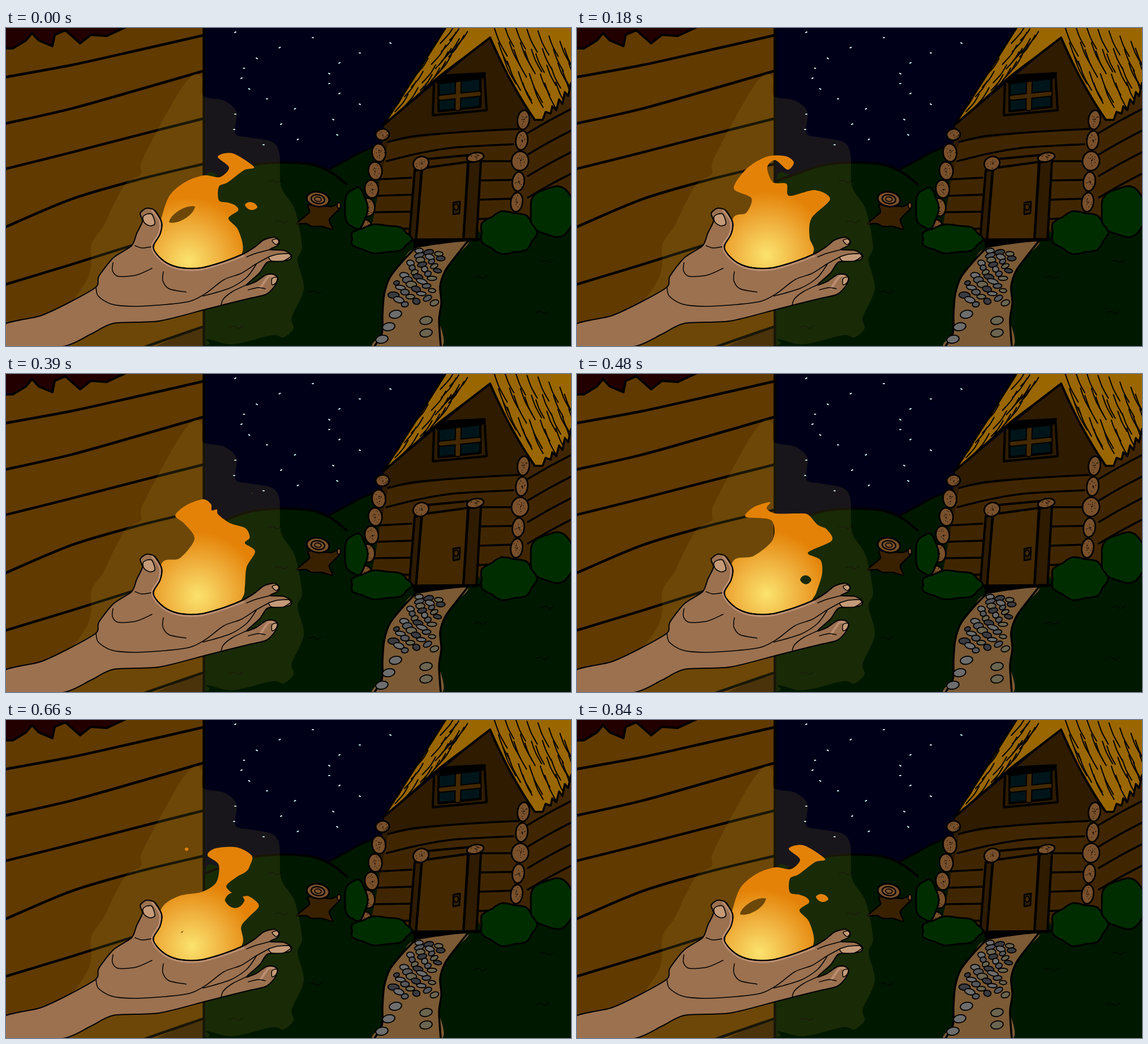
An HTML page with a canvas that plays this animation: 998 px wide and 561 px high, repeating every 870 ms.

```html
<!DOCTYPE html>
<html lang="en">
<head>
<meta charset="utf-8">
<title>Hand flame at night</title>
<style>
  html, body { margin: 0; width: 100%; height: 100%; overflow: hidden; background: #000; }
  canvas { display: block; }
</style>
</head>
<body>
<canvas id="stage" width="998" height="561"></canvas>
<script>
const W = 998, H = 561, LOOP = 870, STEP = 30;
const INK = '#000', DARK = '#2e1b00', LOG = '#402600', STONE = '#79502b', LEAF = '#002d00', NAIL = '#c49a78';

let seed = 7;
const random = (from = 0, to = 1) =>
  from + (to - from) * (seed = seed * 16807 % 2147483647) / 2147483647;
const mix = (a, b, u) => a + (b - a) * u;
const points = s => Array.isArray(s) ? s : s.trim().split(/\s+/).map(p => p.split(',').map(Number));

// Smooth curve through points; bend 0 gives straight edges.
function curve(shape, closed = true, bend = .15) {
  const pts = points(shape), n = pts.length, path = new Path2D();
  const at = i => closed ? pts[(i + n) % n] : pts[Math.max(0, Math.min(n - 1, i))];
  path.moveTo(...pts[0]);
  for (let i = 0; i < (closed ? n : n - 1); i++) {
    const [a, b, c, d] = [at(i - 1), at(i), at(i + 1), at(i + 2)];
    path.bezierCurveTo(b[0] + (c[0] - a[0]) * bend, b[1] + (c[1] - a[1]) * bend,
      c[0] - (d[0] - b[0]) * bend, c[1] - (d[1] - b[1]) * bend, c[0], c[1]);
  }
  if (closed) path.closePath();
  return path;
}

function makeLayer(paint) {
  const canvas = document.createElement('canvas');
  canvas.width = W;
  canvas.height = H;
  const c = canvas.getContext('2d');
  c.lineCap = c.lineJoin = 'round';
  const fillPath = (path, fill, width) => {
    c.fillStyle = fill;
    c.fill(path);
    if (width) strokePath(path, width);
  };
  const strokePath = (path, width, color = INK) => {
    c.lineWidth = width;
    c.strokeStyle = color;
    c.stroke(path);
  };
  paint({
    c,
    area: (s, fill, width, bend) => fillPath(curve(s, true, bend), fill, width),
    line: (s, width, color, bend) => strokePath(curve(s, false, bend), width, color),
    oval(x, y, rx, ry, fill, width, turn = 0) {
      const path = new Path2D();
      path.ellipse(x, y, rx, ry, turn, 0, 7);
      fillPath(path, fill, width);
    },
    bush(x, y, rx, ry, bumps) {
      const rim = Array.from({ length: 28 }, (_, i) => {
        const a = i / 28 * Math.PI * 2, r = 1 + .05 * Math.cos(a * bumps);
        return [x + rx * r * Math.cos(a), y + ry * r * Math.sin(a)];
      });
      fillPath(curve(rim), LEAF, 3);
    }
  });
  return canvas;
}

function landscape({ c, area, line }) {
  c.fillStyle = '#000018';
  c.fillRect(0, 0, W, H);
  for (let i = 0; i < 23; i++) {
    const y = 8 + i * 9, x = 365 + (i * 137 + 40) % (350 - y * .5);
    line([[x - 1, y], [x + 1, y + i % 3 - 1]], 2, '#c4eef2');
  }
  const hill = '352,270 380,260 430,243 470,238 515,238 545,242 575,255 602,276';
  const farHill = '570,250 600,234 625,220 657,207';
  area(farHill + ' 998,207 998,561 570,561', '#001800', 0, 0);
  line(farHill, 3);
  area(hill + ' 660,561 350,561', '#001800', 0, .1);
  line(hill, 4);
  for (const [x, y] of points('463,271 475,342 534,466 826,440 935,502 944,412 395,528'))
    line([[x, y], [x + 9, y - 2], [x + 16, y + 2], [x + 24, y - 3]], 1.2);
}

function stump({ area, oval }) {
  area('534,312 536,325 513,345 530,345 540,350 558,350 577,355 571,338 590,318 589,309 574,315', '#392100', 2.5, .1);
  oval(588, 313, 3, 5, STONE, 2);
  for (const r of [20, 12, 6]) oval(551, 302, r, r * .65, STONE, 1 + r / 10, .15);
}

function thatch({ c, area, line }, roof, edge, strokes, place, dx, dy) {
  area(roof, '#996600', 0, 0);
  c.save();
  c.clip(curve(roof, true, 0));
  for (let i = 0; i < strokes; i++) {
    const [x, y] = place(i / strokes), s = random(.7, 1.2);
    line([[x, y], [x + dx * s * .4, y + dy * s * .5], [x + dx * s, y + dy * s]], 2);
  }
  c.restore();
  line(edge, 3.5, INK, 0);
}

function cabin(pen) {
  const { c, area, line, oval } = pen;
  area('855,17 668,172 650,355 720,378 900,350 935,165', DARK, 0, 0);
  area('675,201 800,184 905,178 895,345 720,378 645,355', LOG, 0, 0);
  area('915,160 998,95 998,340 895,340', LOG, 0, 0);
  line('675,201 720,191 800,184 905,178', 3.5);
  line('672,235 725,222 790,211 896,205', 3.5);
  for (let i = 0; i < 4; i++) {
    line([[660 - i * 5, 267 + i * 29], [716, 264 + i * 30]], 3.5);
    line([[834, 235 + i * 34], [894, 235 + i * 33]], 3.5);
    line([[922, 185 + i * 38], [960, 163 + i * 38], [998, 143 + i * 38]], 3.5);
  }

  const eaves = '934,162 948,162 953,148 962,151 965,138 972,145 977,126 983,134 987,113 993,120 998,97';
  const leftEdge = '778,-3 735,65 690,135 667,171', gable = '855,17 812,50 760,90 715,130 667,171';
  thatch(pen, leftEdge + ' 715,130 760,90 812,50 855,17 870,-5', leftEdge, 26,
    u => [mix(810, 680, u) + random(-15, 30), mix(-10, 140, u)], -24, 32);
  thatch(pen, '855,17 890,90 915,133 ' + eaves + ' 998,-5 780,-5', eaves, 34,
    u => [mix(862, 990, u * 5 % 1) + u * 20, mix(-15, 100, u) + random(0, 20)], 20, 44);
  line(gable, 4);
  line('855,17 870,50 890,90 915,133 934,162', 4);

  area('756,94 845,80 849,145 754,154', DARK, 4, 0);
  area('764,97 838,87 838,139 764,147', '#001519', 4, 0);
  for (const [width, color] of [[12, INK], [8, '#432800']]) {
    line('799,95 798,141', width, color);
    line('768,123 835,116', width - 1, color);
  }
  area('758,94 778,83 846,79 840,89 800,94 766,98', INK, 2, .05);

  area('735,247 816,235 808,373 724,374', '#432800', 4, 0);
  area('722,251 734,251 724,376 712,374', DARK, 4, 0);
  area('817,237 839,233 831,374 808,373', DARK, 4, 0);
  area('745,231 820,224 818,236 745,246', LOG, 4, 0);
  area('720,374 808,372 811,383 722,388', INK, 2, 0);
  line('718,374 835,373', 5);
  area('790,308 802,306 801,327 790,329', DARK, 2.5, 0);
  oval(795, 316, 4, 5, '#432800', 2);

  function stone(x, y, rx, ry, turn = 0) {
    oval(x, y, rx, ry, STONE, 2.8, turn);
    c.fillStyle = INK;
    for (let k = 0; k < 14; k++) {
      const a = random(0, 6.3), r = random(0, .75);
      c.fillRect(x + Math.cos(a) * rx * r, y + Math.sin(a) * ry * r, 1.2, 1.2);
    }
  }
  for (let i = 0; i < 6; i++) stone(665 - i * 6.4, 188 + i * 32, 12, i % 5 ? 16 : 10, -.1);
  for (let i = 0; i < 5; i++) stone(914 - i * 3, 162 + i * 36.3, i === 2 ? 15 : 10.5, 17, .12);
  stone(733, 239, 14, 12, -.4);
  stone(829, 228, 15, 8, -.2);
}

function garden({ area, line, oval, bush }) {
  const left = '722,389 700,412 678,440 668,470 665,505 664,538 650,563';
  const right = '768,563 765,515 769,485 767,455 776,428 795,402 815,377';
  area(left + ' ' + right, '#7b5a35', 0, .12);
  line(left, 3.5);
  line(right, 3.5);
  const greys = ['#6d6d6d', '#3a3b40', '#6b6550', '#55575b'];
  for (let i = 0; i < 36; i++) {
    const y = 393 + i * 2.7, x = 715 + ((500 - y) / 17) ** 2 + (i * .382 % 1 - .5) * mix(50, 86, i / 36);
    oval(x, y, random(5, 10), random(3.5, 6), greys[i % 4], 1.8, random(-.5, .3));
  }
  for (let i = 0; i < 5; i++)
    oval(i % 2 ? 742 : 688 - i * 6, 505 + i * 11, 11, 7, greys[i * 2 % 4], 1.8, -.2);

  bush(618, 318, 20, 36, 5);
  bush(662, 372, 53, 25, 7);
  bush(967, 324, 42, 44, 5);
  bush(887, 361, 49, 37, 7);
}

function wall({ c, area, line }) {
  c.fillStyle = '#613a00';
  c.fillRect(0, 0, 349, H);
  area('266,561 310,541 349,527 349,561', '#3a2205', 0, 0);
  // height at each end and bow of every plank gap
  for (const [y0, y1, bow] of [[87, 13, 3], [169, 76, 4], [249, 160, 0], [352, 240, -13], [453, 345, 0], [660, 527, -5]])
    line([[-3, y0], [115, mix(y0, y1, .33) + bow], [232, mix(y0, y1, .67) + bow * .7], [348, y1]], 4.5);
  line('349.5,-5 349.5,566', 4.5);
  area('-5,-5 -5,36 12,36 35,22 46,9 58,22 82,32 86,12 105,4 131,27 150,12 178,14 219,-5', '#220000', 4, 0);
  area(`335,80 318,95 300,122 264,187 239,237 238,258 212,274 190,312 172,350 151,382 146,438 90,561
    340,561 355,549 400,558 470,542 490,546 508,530 505,510 526,460 515,410 523,385 510,320 486,280
    483,222 470,201 430,193 405,186 407,148 385,128 348,120 346,90`, 'rgba(165,145,50,.15)');
}

function hand({ area, line }) {
  const palm = '263,322 275,343 272,364 260,385 267,400 285,415 310,423 345,423 385,412 420,398 440,386';
  area(`-5,524 60,508 110,485 159,457 164,438 190,405 222,384 231,362 241,341 237,327 248,318 ${palm}
    455,374 474,369 483,376 479,384 466,391 490,392 504,400 502,408 488,411 462,413 448,432 425,453
    442,447 460,435 474,435 480,442 474,456 459,470 430,477 385,488 350,497 270,517 190,521 150,540 100,562 -5,566`,
    '#9b7150', 2, .13);
  line('258,322 271,340 270,362 258,383 264,400 283,417 310,426 345,426 388,414 420,402', 3, '#bb8e72');
  line('449,459 463,439 472,438', 4, '#bb8e72');
  line(palm, 2);
  area('242,333 250,328 258,329 263,345 254,349 244,343', NAIL, 1.6);
  area('464,404 480,399 499,398 503,403 490,411 469,411', NAIL, 1.6, .08);
  area('470,375 478,372 482,377 477,382', NAIL, 1.4);
  area('470,442 479,440 477,449 470,453', NAIL, 1.4);
  ['189,414 188,428 198,438 230,436 258,424',
    '159,457 163,473 186,487 225,491 280,488 325,482 353,468 385,444 415,433 442,416 466,403',
    '278,430 277,446 288,460 318,466', '466,391 440,398 425,404',
    '442,417 425,440 395,459 348,473', '425,453 400,465 384,478 380,489',
    '228,384 240,388 256,386', '428,462 445,458 458,460'].forEach(s => line(s, 1.5));
}

const back = makeLayer(pen => [landscape, stump, cabin, garden, wall].forEach(part => part(pen)));
const front = makeLayer(hand);
let fire;
const flame = makeLayer(pen => { fire = pen.c; });

// time, glow centre, then the outline from the thumb over the top to the fingers
const poses = [
  [0, `322,410 276,330 290,294 318,271 350,260 378,263 394,246 374,227 400,221 438,245 420,251 392,272 376,280
    376,304 392,308 405,313 410,322 393,336 410,356`],
  [180, `335,400 276,335 299,326 308,300 277,283 300,248 335,227 368,226 383,237 372,250 350,233 336,246 346,272
    370,275 375,296 420,286 447,302 414,336 411,370`],
  [300, `343,395 276,335 302,329 320,290 288,271 300,247 325,228 355,216 389,222 377,235 355,232 342,248 366,260
    405,270 411,283 436,282 450,298 417,330 420,367`],
  [480, `335,388 276,330 312,321 346,292 343,258 298,252 312,235 341,226 335,237 350,246 390,246 408,248 425,266
    441,274 450,294 408,315 430,328 433,352 424,382`],
  [600, `330,398 274,333 305,318 350,315 370,290 368,260 348,242 366,231 405,229 431,234 432,253 440,264 412,267
    398,285 412,311 446,318 450,335 421,354 417,376`],
  [750, `326,400 275,333 305,300 342,285 374,280 387,248 368,234 375,220 411,218 439,248 428,265 400,273 396,295
    376,308 409,313 402,300 442,316 441,338 413,348`]
].map(([t, s]) => [t, points(s)]);
poses.push([840, poses[0][1]]);
const BASE = points('418,394 390,428 310,440 275,420 262,390');

// Rising pockets: x, y, width, height and turn at full size, time of full size, lifetime each way
const holes = [[311, 329, 54, 18, -.55, 840, 200], [404, 333, 50, 40, 0, 600, 200]];
const sparks = [[433, 314, 23, 14, .2, 840, 110], [434, 233, 8, 6, 0, 300, 110], [319, 243, 15, 13, 0, 600, 110]];

function pocket([x, y, w, h, turn, peak, life], t) {
  const age = (t - peak + LOOP * 1.5) % LOOP - LOOP / 2;
  const size = Math.max(0, 1 - Math.abs(age) / life) / 2;
  fire.save();
  fire.translate(x, y - age * .25);
  fire.rotate(turn);
  fire.scale(w * size, h * size);
  fire.beginPath();
  fire.moveTo(-1, 0);
  fire.bezierCurveTo(-.7, -1.3, .6, -1.3, 1, 0);
  fire.bezierCurveTo(.6, 1.3, -.5, 1.3, -1, 0);
  fire.restore();
  fire.fill();
}

function drawFlame(t) {
  const next = Math.max(1, poses.findIndex(pose => pose[0] >= t));
  const [[t0, from], [t1, to]] = [poses[next - 1], poses[next]];
  const u = (t - t0) / (t1 - t0);
  const [[x, y], ...outline] = from.map((p, i) => p.map((v, axis) => mix(v, to[i][axis], u)));

  const glow = fire.createRadialGradient(x, y, 0, x, y, 112);
  glow.addColorStop(0, '#fbe36e');
  glow.addColorStop(.5, '#f0b240');
  glow.addColorStop(1, '#e48207');
  fire.clearRect(0, 0, W, H);
  fire.fillStyle = glow;
  fire.fill(curve([...outline, ...BASE]));
  fire.globalCompositeOperation = 'destination-out';
  for (const hole of holes) pocket(hole, t);
  fire.globalCompositeOperation = 'source-over';
  for (const spark of sparks) pocket(spark, t);
}

const stage = document.getElementById('stage').getContext('2d');

function render(now) {
  drawFlame(Math.floor(now % LOOP / STEP) * STEP || LOOP - STEP);
  for (const layer of [back, flame, front]) stage.drawImage(layer, 0, 0);
  requestAnimationFrame(render);
}
render(0);
</script>
</body>
</html>
```
